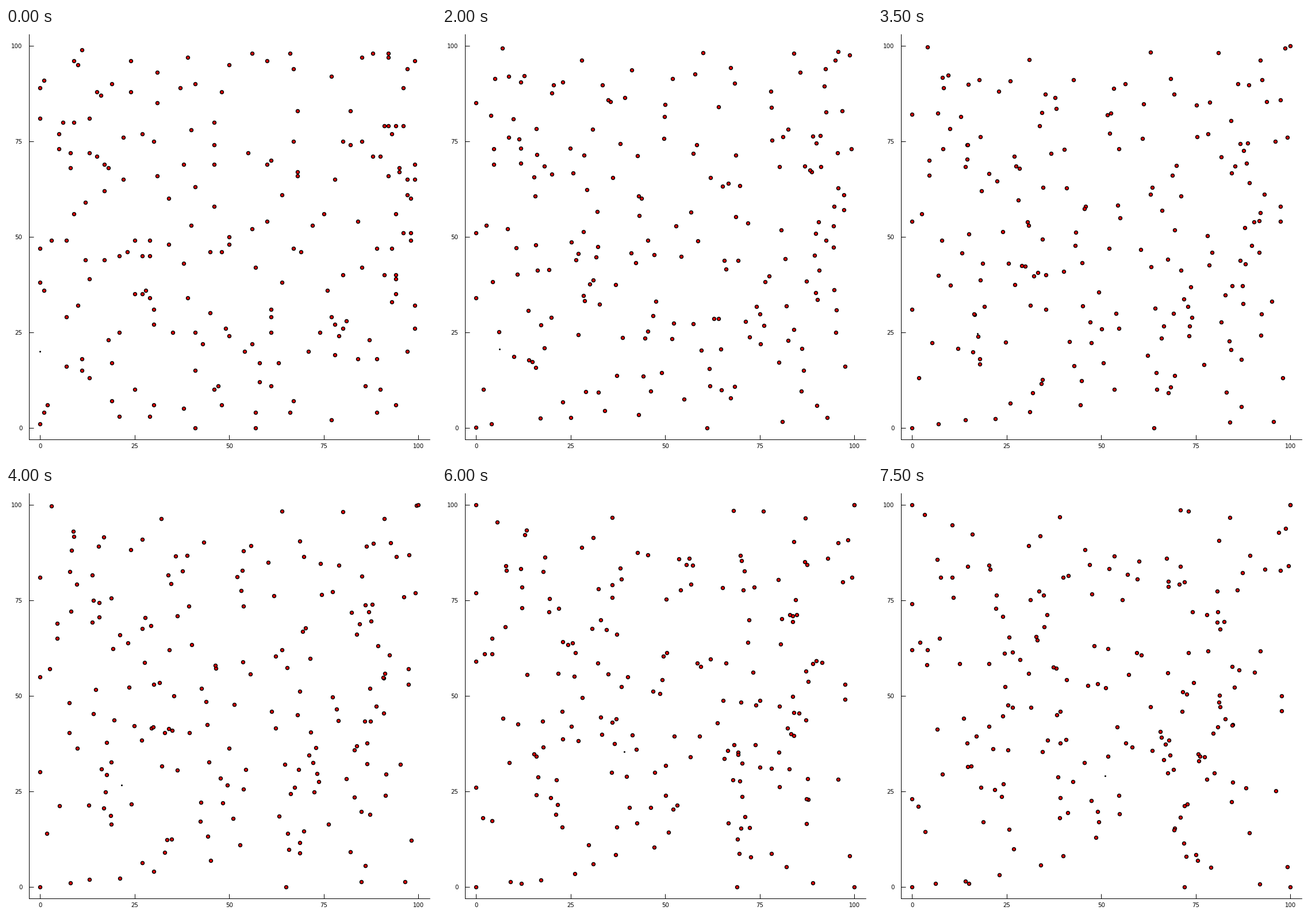
These frames come from a looping animation (748 by 749 pixels, 8000 ms). A matplotlib script:

```python
import numpy as np
import matplotlib.pyplot as plt
from matplotlib.animation import FuncAnimation

W, H, DPI = 748, 749, 100
STEPS, STEP_MS = 16, 500
EXTRA = 130  # scattered dots besides the placed ones


def pt(px):
    return px * 72 / DPI


# Placed dots, grouped by the corner they head for.
STARTS = {
    (0, 0): [(9, 96), (37, 89), (5, 77), (93, 77), (30, 75), (90, 71),
             (38, 69), (9, 56), (84, 54), (96, 51), (68, 66), (21, 45),
             (45, 46), (99, 32), (30, 27), (41, 15), (1, 4)],
    (100, 0): [(66, 98), (39, 97), (85, 97), (31, 93), (48, 88), (77, 92),
               (22, 76), (97, 61), (41, 63), (7, 49), (67, 47), (10, 32),
               (35, 25), (25, 10), (0, 1), (61, 11), (58, 17), (80, 26),
               (97, 20)],
    (0, 100): [(11, 99), (88, 98), (99, 96), (24, 88), (82, 83), (61, 70),
               (17, 62), (46, 58), (3, 49), (57, 42), (94, 39), (39, 34),
               (18, 23), (74, 25), (87, 23), (2, 6), (57, 4)],
    (100, 100): [(56, 98), (1, 91), (19, 90), (6, 80), (46, 80), (80, 75),
                 (28, 36), (50, 50), (64, 61), (64, 38), (45, 30), (13, 13),
                 (41, 0), (86, 11)],
}


def make_dots():
    rng = np.random.default_rng(12)
    placed = [p for group in STARTS.values() for p in group]
    goals = [c for c, group in STARTS.items() for _ in group]
    corners = np.array(list(STARTS))
    taken = set(placed)
    while len(placed) < len(taken) or len(placed) < EXTRA + len(goals_fixed):
        p = tuple(int(v) for v in rng.integers(0, 100, 2))
        if p not in taken:
            taken.add(p)
            placed.append(p)
            goals.append(tuple(corners[rng.integers(4)]))
    return np.array(placed, float), np.array(goals, float)


goals_fixed = [p for group in STARTS.values() for p in group]
start, goal = make_dots()
reach = np.hypot(*(goal - start).T)
heading = (goal - start) / reach[:, None]

# Path of the small black walker.
KNOT = [0, 2, 5, 8, 10, 12, 15]
WALK_X = [0, 1, 8.9, 21.5, 30.6, 39.2, 51]
WALK_Y = [20, 20, 20.8, 26.6, 30.3, 35.3, 29]

fig = plt.figure(figsize=(W / DPI, H / DPI), dpi=DPI, facecolor="white")
left, right, top, bottom = 39.5, 737, 11, 714.5
ax = fig.add_axes([left / W, 1 - bottom / H,
                   (right - left) / W, (bottom - top) / H])
ax.set(xlim=(-3, 103), ylim=(-3, 103),
       xticks=range(0, 101, 25), yticks=range(0, 101, 25))
ax.spines[["top", "right"]].set_visible(False)
ax.spines[["left", "bottom"]].set_linewidth(pt(1))
ax.tick_params(direction="in", length=pt(8), width=pt(1),
               labelsize=pt(10.3), labelfontfamily="DejaVu Sans")
ax.tick_params(axis="x", pad=pt(8))
ax.tick_params(axis="y", pad=pt(11))

dots, = ax.plot([], [], "o", ms=pt(5.9), mfc="#f00000", mec="black",
                mew=pt(1.5), clip_on=False, zorder=3)
walker, = ax.plot([], [], "o", ms=pt(3), color="black", mew=0, zorder=4)


def draw(i):
    # One unit per step, stopping at the corner.
    pos = start + heading * np.minimum(i, reach)[:, None]
    dots.set_data(pos[:, 0], pos[:, 1])
    walker.set_data([np.interp(i, KNOT, WALK_X)], [np.interp(i, KNOT, WALK_Y)])
    return dots, walker


anim = FuncAnimation(fig, draw, frames=STEPS, interval=STEP_MS,
                     repeat=True, repeat_delay=0)
plt.show()
```
